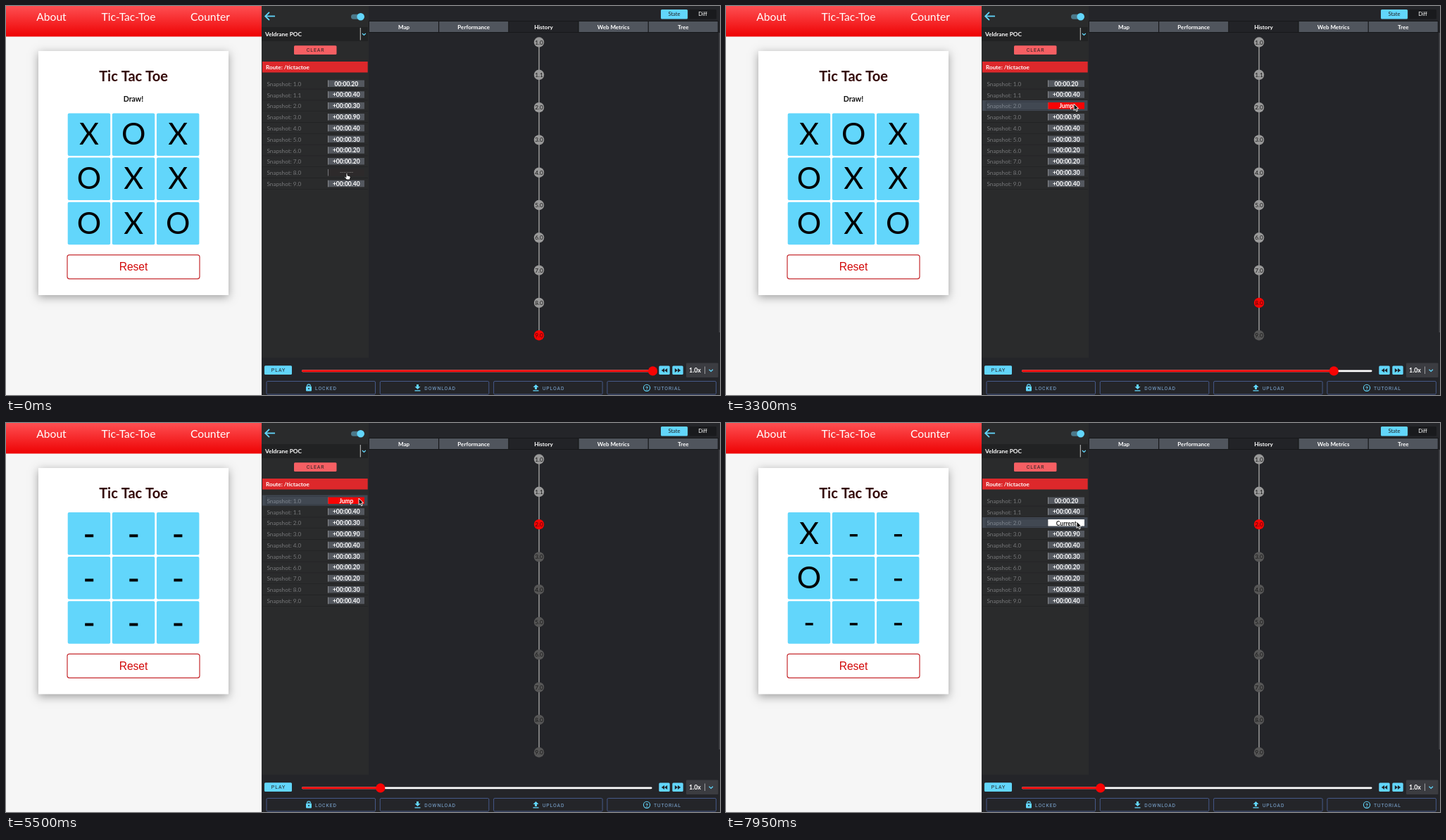
An HTML page with a canvas for the animation above (8000 ms loop, 1014 by 553 pixels).

```html
<!DOCTYPE html>
<html lang="en">
<head>
<meta charset="utf-8">
<title>Snapshot debugger</title>
<style>
html, body { margin: 0; width: 100%; height: 100%; overflow: hidden; background: #f6f6f6; }
canvas { display: block; }
</style>
</head>
<body>
<canvas id="stage" width="1014" height="553"></canvas>
<script>
const ctx = document.getElementById('stage').getContext('2d');
const LOOP = 8000;
const CYAN = '#62d6fb', RED = '#f80404', DARK = '#242529';
const LATO = 'Lato, sans-serif', ROBOTO = 'Roboto, sans-serif', ARIAL = '"Liberation Sans", Arial, sans-serif';

const labels = ['1.0', '1.1', '2.0', '3.0', '4.0', '5.0', '6.0', '7.0', '8.0', '9.0'];
const tenths = [2, 4, 3, 9, 4, 3, 2, 2, 3, 4];

// Step timelines: [start, value]
const boards = [[0, 'XOXOXXOXO'], [4300, 'X--O-----'], [5500, '_________'], [7650, 'X--O-----']];
const positions = [[0, 9], [1400, 8], [4300, 2], [5550, 0], [7700, 2]];
const highlights = [[0, -1], [1350, 9], [3300, 2], [4200, 9], [4300, 2], [5500, 0], [7650, 2]];
const hovers = [[-30, 8], [1900, 7], [1950, 6], [2000, 5], [2040, 4], [2080, 3], [2120, 2],
  [4730, 1], [4800, 0], [6120, 1], [6220, 2], [6300, 3], [6400, 4], [6780, 3], [6950, 2]];
const hands = [[0, true], [500, false], [1850, true], [2450, false], [4600, true], [5075, false], [6000, true], [7275, false]];
const path = [[0, 484, 237], [1850, 484, 237], [2150, 502, 134], [2450, 494, 139], [4600, 494, 139],
  [5000, 501, 107], [6000, 501, 107], [6450, 500, 171], [6650, 500, 170], [6850, 499, 148],
  [7250, 498, 140], [LOOP, 498, 140]];

const stepAt = (steps, t) => steps.findLast(s => s[0] <= t);
const valueAt = (steps, t) => stepAt(steps, t)[1];

function cursorAt(t) {
  const i = Math.max(1, path.findIndex(k => k[0] > t));
  const [t0, x0, y0] = path[i - 1], [t1, x1, y1] = path[i];
  const u = (t - t0) / (t1 - t0), e = u * u * (3 - 2 * u);
  return [x0 + (x1 - x0) * e, y0 + (y1 - y0) * e];
}

function rect(x, y, w, h, fill, r = 0) {
  ctx.fillStyle = fill;
  ctx.beginPath();
  ctx.roundRect(x, y, w, h, r);
  ctx.fill();
}
function frame(x, y, w, h, color, r = 0, width = 1) {
  ctx.strokeStyle = color;
  ctx.lineWidth = width;
  ctx.beginPath();
  ctx.roundRect(x, y, w, h, r);
  ctx.stroke();
}
function disc(x, y, r, fill) {
  ctx.fillStyle = fill;
  ctx.beginPath();
  ctx.arc(x, y, r, 0, 7);
  ctx.fill();
}
function line(points, color, width = 1) {
  ctx.strokeStyle = color;
  ctx.lineWidth = width;
  ctx.beginPath();
  points.forEach(([x, y]) => ctx.lineTo(x, y));
  ctx.stroke();
}
function shape(points, fill, outline) {
  ctx.beginPath();
  points.forEach(([x, y]) => ctx.lineTo(x, y));
  ctx.closePath();
  ctx.fillStyle = fill;
  ctx.fill();
  if (outline) {
    ctx.strokeStyle = outline;
    ctx.lineWidth = 0.9;
    ctx.stroke();
  }
}
// y is the baseline
function text(str, x, y, font, color, align = 'center', spacing = 0) {
  ctx.font = font;
  ctx.textAlign = align;
  ctx.letterSpacing = spacing + 'px';
  ctx.fillStyle = color;
  ctx.fillText(str, x, y);
  ctx.letterSpacing = '0px';
}

function drawPage(t) {
  const board = valueAt(boards, t), done = !/[-_]/.test(board);
  const shift = done ? 25.5 : 0;
  rect(0, 0, 363, 553, '#f6f6f6');
  const bar = ctx.createLinearGradient(0, 0, 0, 43);
  bar.addColorStop(0, '#fe4f52');
  bar.addColorStop(1, '#ee0304');
  rect(0, 0, 363, 43.5, bar);
  const nav = '15.6px ' + LATO;
  text('About', 64.5, 21, nav, '#fff');
  text('Tic-Tac-Toe', 174, 21, nav, '#fff');
  text('Counter', 290, 21, nav, '#fff');

  ctx.save();
  ctx.shadowColor = 'rgba(0,0,0,.36)';
  ctx.shadowBlur = 12;
  ctx.shadowOffsetY = 3;
  rect(46, 64, 270, 321.5 + shift, '#fff');
  ctx.restore();
  text('Tic Tac Toe', 181, 107, 'bold 20px ' + LATO, '#340808');
  if (done) text('Draw!', 181, 136, 'bold 10.5px ' + LATO, '#111');

  [...board].forEach((mark, i) => {
    const x = 87.7 + i % 3 * 63.1, y = 127 + shift + Math.floor(i / 3) * 63.1;
    rect(x, y, 60.5, 60.5, CYAN, 2);
    if (mark === '_') rect(x + 24.5, y + 31.3, 12, 4, '#000');
    else if (mark === '-') rect(x + 25, y + 31, 11, 3.4, '#000');
    else text(mark, x + 30.3, y + 44.8, '43px ' + LATO, '#000');
  });
  frame(87, 328.3 + shift, 188, 34, '#c52a2e', 3, 1.2);
  text('Reset', 181, 350.5 + shift, '15.6px ' + ARIAL, '#d20a0a');
}

function drawRow(i, t) {
  const mid = 110.5 + i * 15.8;
  const [since, hovered] = stepAt(hovers, t);
  const lit = valueAt(highlights, t) === i;
  if (lit) {
    rect(364, mid - 8, 149.5, 15, '#414852');
    frame(369.5, mid - 6, 88, 11.5, '#343a43');
  } else {
    rect(364, mid + 7.2, 150, 0.8, '#222324');
  }
  text('Snapshot: ' + labels[i], 370.5, mid + 3.3, '8.2px ' + LATO, lit ? '#7c838c' : '#77787a', 'left');

  const font = 'bold 8.5px ' + LATO;
  if (hovered !== i) {
    rect(457, mid - 5, 52, 9.5, '#54585f');
    rect(457, mid - 5, 1, 9.5, '#85888d');
    text((i ? '+' : '') + '00:00.' + tenths[i] + '0', 483.3, mid + 3, font, '#fff');
    return;
  }
  const current = lit && valueAt(positions, t) === i;
  const p = Math.min(1, (t - since) / 250);
  rect(457, mid - 5, 1, 9.5, '#74777b');
  ctx.save();
  ctx.globalAlpha = p * p;
  rect(457.5, mid - 5, 51.5, 9.5, current ? '#fff' : RED);
  ctx.globalAlpha = 0.3 + 0.7 * p;
  ctx.translate(483.3, mid);
  ctx.scale(1, p);
  text(current ? 'Current' : 'Jump', 0, current ? 4 : 3, font, current ? '#222' : '#fff');
  ctx.restore();
}

function drawSidebar(t) {
  rect(363, 0, 152, 500, '#2a2b2c');
  rect(363, 30, 151, 20, '#212223');
  line([[374, 8.8], [368.2, 14.5], [374, 20.2]], CYAN, 1.8);
  line([[368.2, 14.5], [382, 14.5]], CYAN, 1.8);
  rect(490, 11.8, 17, 7, '#4b7889', 3.5);
  disc(503.7, 15.2, 5.3, CYAN);
  text('Veldrane POC', 368, 43.2, 'bold 8.3px ' + LATO, '#fff', 'left');
  rect(502.8, 31, 1, 17.5, '#c8c8c8');
  line([[506, 39], [508.4, 41.4], [510.8, 39]], CYAN, 1.3);
  rect(409, 56.3, 60.5, 12.7, '#f65f63', 1.5);
  text('CLEAR', 439.6, 65.2, '7px ' + ROBOTO, '#222', 'center', 0.9);
  rect(364, 79, 149.7, 15.5, '#dd282b');
  text('Route: /tictactoe', 369, 89.8, 'bold 8.2px ' + LATO, '#fff', 'left');
  labels.forEach((_, i) => drawRow(i, t));
}

function drawHistory(t) {
  const font = 'bold 8px ' + LATO;
  rect(930, 5, 38, 13.5, CYAN, 1.5);
  text('State', 949, 14.4, '7.6px ' + LATO, '#222');
  rect(970, 5, 39, 13.5, '#191a1d', 1.5);
  text('Diff', 989.5, 14.4, '7.6px ' + LATO, '#fff');
  rect(515, 21, 497, 17, '#17181a');
  ['Map', 'Performance', 'History', 'Web Metrics', 'Tree'].forEach((name, i) => {
    const x = 516 + i * 99.2;
    rect(x, 22, 98, 15, i === 2 ? '#222327' : '#50555d');
    text(name, x + 49, 32.5, font, '#fff');
  });
  rect(1012.5, 38, 1.5, 426, '#45464a');

  const pos = valueAt(positions, t);
  line([[757, 51], [757, 468]], '#929292', 1.6);
  labels.forEach((label, i) => {
    const y = 51.5 + i * 46.3;
    disc(757, y, 7.2, i === pos ? RED : i < pos ? '#999' : '#565656');
    text(label, 757, y + 3, '8.3px ' + LATO, i === pos ? '#4b0808' : '#171717');
  });
}

const icons = {
  LOCKED(x) {
    rect(x - 4, 540.5, 8, 7, CYAN, 1);
    ctx.strokeStyle = CYAN;
    ctx.lineWidth = 1.2;
    ctx.beginPath();
    ctx.arc(x, 540.3, 2.4, Math.PI, 0);
    ctx.stroke();
    disc(x, 544, 1, DARK);
  },
  DOWNLOAD(x) {
    rect(x - 1.5, 538, 3, 4, CYAN);
    shape([[x - 4, 541], [x + 4, 541], [x, 545]], CYAN);
    rect(x - 4, 546.2, 8, 1.3, CYAN);
  },
  UPLOAD(x) {
    rect(x - 1.5, 541, 3, 4, CYAN);
    shape([[x - 4, 542], [x + 4, 542], [x, 538]], CYAN);
    rect(x - 4, 546.2, 8, 1.3, CYAN);
  },
  TUTORIAL(x) {
    frame(x - 4.6, 538.2, 9.2, 9.2, CYAN, 4.6, 1.1);
    text('?', x, 545.6, 'bold 7.5px ' + ROBOTO, CYAN);
  }
};

function drawControls(t) {
  const knob = 421.3 + valueAt(positions, t) * 55.25;
  rect(367, 511.3, 39, 12.7, CYAN, 1.5);
  text('PLAY', 387, 520.2, '7px ' + ROBOTO, '#222', 'center', 0.9);
  rect(420, 517.4, 497.5, 2.8, '#fff', 1.4);
  rect(420, 517.4, knob - 420, 2.8, RED, 1.4);
  disc(knob, 518.9, 6.6, RED);

  [[935, -1], [954, 1]].forEach(([x, dir]) => {
    rect(x - 7.7, 511.5, 15.4, 12.5, CYAN, 1.5);
    [-4.2, 0].forEach(dx => {
      const a = x + dx * dir, b = a + 4.2 * dir;
      shape([[a, 515], [b, 518], [a, 521]], '#20242a');
    });
  });
  rect(966, 507.5, 45.5, 20.5, '#3b3c41', 1);
  text('1.0x', 978.5, 521.3, 'bold 8.8px ' + LATO, '#fff');
  rect(992, 512.5, 1, 10.5, '#9b9ca0');
  line([[998.5, 516.8], [1001.2, 519.4], [1003.9, 516.8]], CYAN, 1.3);

  [['LOCKED', 430, 439], ['DOWNLOAD', 584.5, 594.3], ['UPLOAD', 752.5, 762], ['TUTORIAL', 910, 920]]
    .forEach(([name, iconX, textX], i) => {
      frame(370 + i * 161.3, 533.5, 154.5, 18.5, '#465989', 1.5);
      icons[name](iconX);
      text(name, textX, 545.6, '6.9px ' + ROBOTO, '#80acd8', 'left', 0.9);
    });
}

function drawCursor(t) {
  const [x, y] = cursorAt(t);
  ctx.save();
  ctx.translate(x, y);
  ctx.lineJoin = 'round';
  if (valueAt(hands, t)) {
    shape([[-1, 0.8], [0, 0.2], [0.9, 1], [1, 4], [4.8, 5], [5.2, 6.5], [4.2, 10], [-0.2, 10],
      [-3.2, 6.4], [-2.6, 5.3], [-1, 6.6]], '#fff', '#111');
  } else {
    shape([[0, 0], [0, 9.4], [2.1, 7.5], [3.6, 10.8], [5.2, 10.1], [3.8, 6.9], [6.6, 6.7]], '#111', '#fff');
  }
  ctx.restore();
}

function draw(now) {
  const t = now % LOOP;
  rect(363, 0, 651, 553, DARK);
  drawPage(t);
  drawSidebar(t);
  drawHistory(t);
  drawControls(t);
  drawCursor(t);
}

const start = performance.now();
function tick() {
  draw(performance.now() - start);
  requestAnimationFrame(tick);
}
tick();
</script>
</body>
</html>
```
